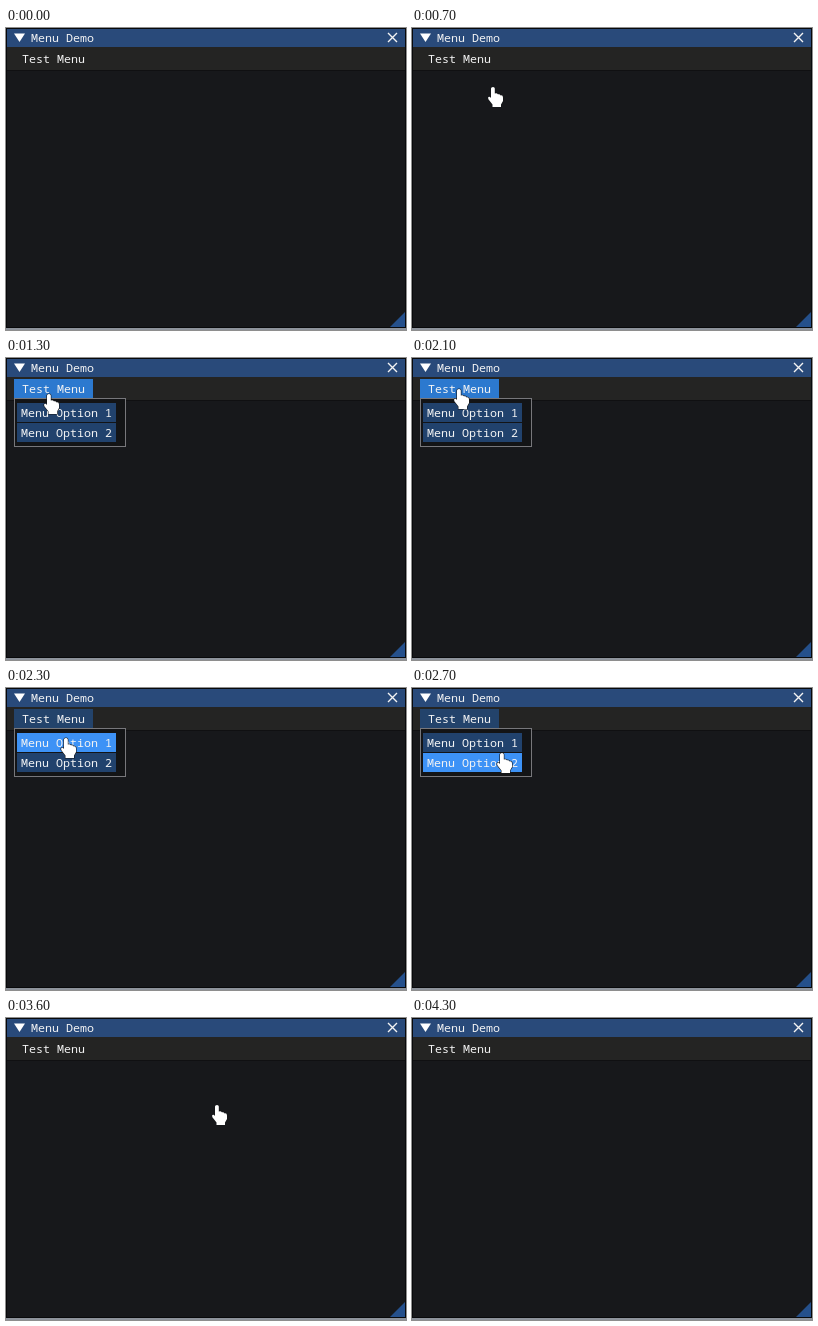
Write an HTML page with a canvas that moves like this. It is 400 by 302 pixels and loops after 4.6 s.

```html
<!DOCTYPE html>
<html lang="en">
<head>
<meta charset="utf-8">
<title>Menu Demo</title>
<style>
  html, body { margin: 0; height: 100%; overflow: hidden; background: #17181b; }
  canvas { display: block; width: 400px; height: 302px; }
</style>
</head>
<body>
<canvas id="stage" width="400" height="302"></canvas>
<script>
const ctx = document.getElementById('stage').getContext('2d');
const LOOP = 4600, STEP = 100;
const MENU_OPENS = 1100, MENU_CLOSES = 3600;

// Fingertip positions: time, x, y
const pointerPath = [
  [100, 412, 310], [200, 388, 262], [300, 331, 196], [400, 250, 142],
  [500, 196, 119], [600, 131, 87], [700, 81, 59], [800, 56, 44],
  [1000, 43, 36], [1700, 43, 36], [1800, 46, 33], [2000, 46, 33],
  [2100, 47, 31], [2300, 60, 50], [2500, 84, 74], [2700, 90, 65],
  [2800, 93, 66], [3000, 128, 69], [3200, 183, 79], [3300, 211, 87],
  [3700, 211, 87], [3800, 214, 100], [3900, 226, 160], [4000, 246, 252],
  [4100, 252, 325]
];

const hand = new Path2D(`M-2 1.5 Q-2 0 0 0 Q1.8 0 1.8 1.5 V6.5
  Q4 5.8 4.8 7.3 Q7 6.8 7.6 8.4 Q10 8 10 10.5 V14 L8 17.5 V20 H-.5 V17.5
  L-4.6 12.2 Q-5.6 10.2 -4 9.8 Q-3 9.7 -2 11 Z`);

function pointerAt(t) {
  const next = pointerPath.findIndex(([time]) => time > t);
  if (next < 1) return { x: 500, y: 400 };
  const [t0, x0, y0] = pointerPath[next - 1];
  const [t1, x1, y1] = pointerPath[next];
  const k = (t - t0) / (t1 - t0);
  return { x: Math.round(x0 + (x1 - x0) * k), y: Math.round(y0 + (y1 - y0) * k) };
}

function rect(color, x, y, w, h) {
  ctx.fillStyle = color;
  ctx.fillRect(x, y, w, h);
}

function polygon(color, ...points) {
  ctx.fillStyle = color;
  ctx.beginPath();
  points.forEach(([x, y]) => ctx.lineTo(x, y));
  ctx.fill();
}

function label(text, x, baseline) {
  ctx.font = '11.67px "Noto Sans Mono", "DejaVu Sans Mono", monospace';
  ctx.fillStyle = '#f4f4f4';
  ctx.fillText(text, x, baseline);
}

const inside = (p, x, y, w, h) => p.x >= x && p.x < x + w && p.y >= y && p.y < y + h;

function drawWindow() {
  rect('#17181b', 0, 0, 400, 302);
  rect('#294a7a', 1, 1, 398, 18);
  rect('#242423', 1, 19, 398, 23);
  rect('#101012', 1, 42, 398, 1);
  polygon('#fff', [8, 5.5], [19, 5.5], [13.5, 14]);
  ctx.strokeStyle = '#f4f4f4';
  ctx.lineWidth = 1.4;
  ctx.beginPath();
  ctx.moveTo(382, 5); ctx.lineTo(391, 14);
  ctx.moveTo(391, 5); ctx.lineTo(382, 14);
  ctx.stroke();
  label('Menu Demo', 25, 14);
  polygon('#25508c', [384, 299], [399, 284], [399, 299]);
  ctx.strokeStyle = '#08090b';
  ctx.lineWidth = 1;
  ctx.strokeRect(.5, .5, 399, 299);
  rect('#8e939c', 0, 300, 400, 2);
}

function drawPopup(pointer) {
  rect('#131416', 8, 40, 112, 49);
  ctx.strokeStyle = '#77777b';
  ctx.lineWidth = 1;
  ctx.strokeRect(8.5, 40.5, 111, 48);
  ['Menu Option 1', 'Menu Option 2'].forEach((text, i) => {
    const box = [11, 45 + 20 * i, 99, 19];
    rect(inside(pointer, ...box) ? '#3d92f6' : '#21426d', ...box);
    label(text, 15, 59 + 20 * i);
  });
}

function drawPointer({ x, y }) {
  ctx.save();
  ctx.translate(x, y);
  ctx.strokeStyle = '#15171a';
  ctx.lineWidth = 1.2;
  ctx.stroke(hand);
  ctx.fillStyle = '#fff';
  ctx.fill(hand);
  ctx.restore();
}

function draw(now) {
  const t = Math.floor((now % LOOP) / STEP) * STEP;
  const pointer = pointerAt(t);
  const open = t >= MENU_OPENS && t < MENU_CLOSES;
  const menuBox = [8, 21, 79, 20];
  const hovered = inside(pointer, ...menuBox);

  drawWindow();
  if (open || hovered) rect(hovered ? '#2c79cf' : '#23436b', ...menuBox);
  label('Test Menu', 16, 35);
  if (open) drawPopup(pointer);
  drawPointer(pointer);
}

const start = performance.now();
function frame() {
  draw(performance.now() - start);
  requestAnimationFrame(frame);
}
frame();
</script>
</body>
</html>
```
